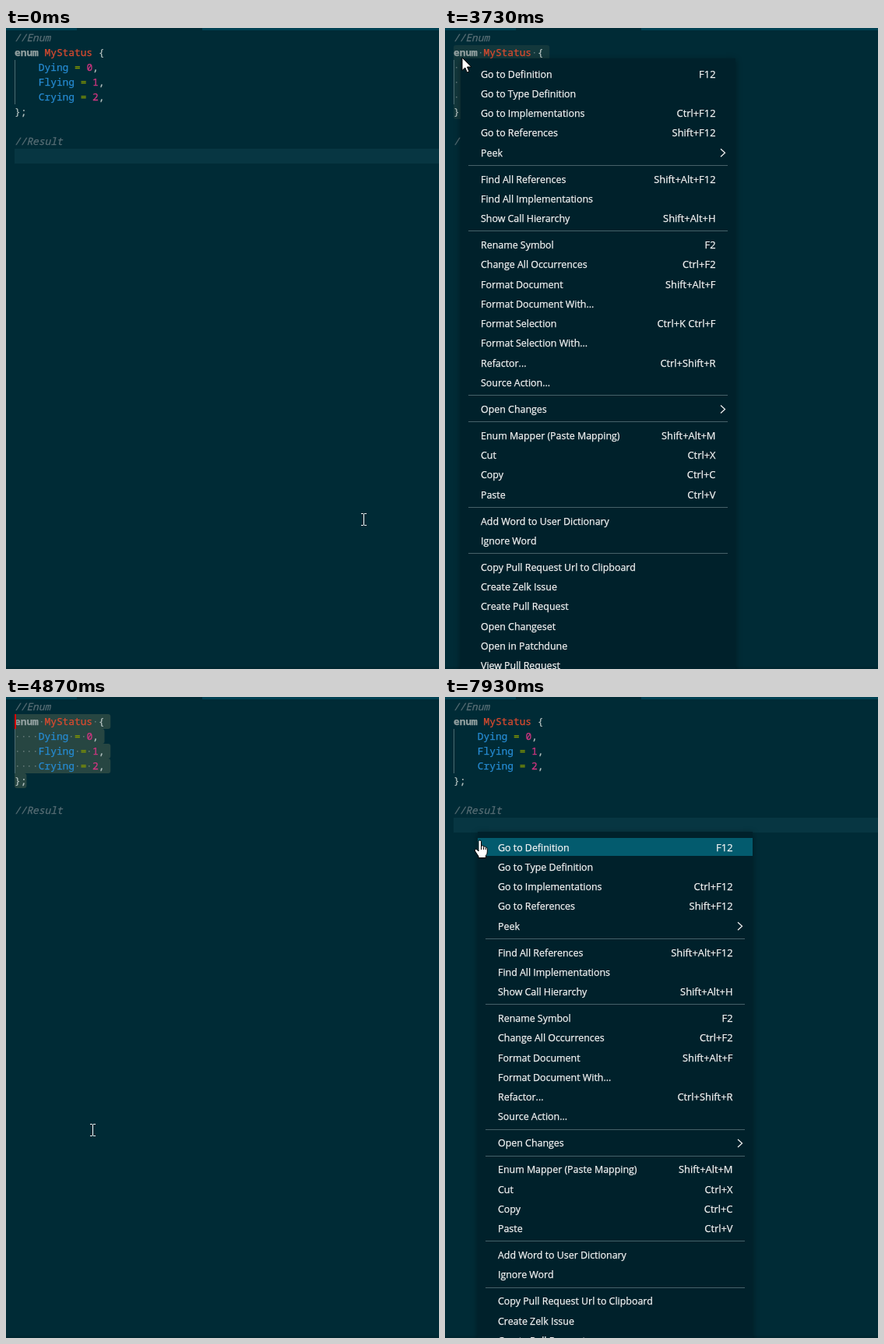
These frames come from a looping animation (556 px wide and 823 px high, 8 s). An HTML page with a canvas:

```html
<!DOCTYPE html>
<html lang="en">
<head>
<meta charset="utf-8">
<title>Enum editor</title>
<style>
html, body { margin: 0; width: 100%; height: 100%; overflow: hidden; background: #002b36; }
canvas { display: block; }
</style>
</head>
<body>
<canvas id="stage" width="556" height="823"></canvas>
<script>
const ctx = document.getElementById('stage').getContext('2d');
const W = 556, H = 823, LOOP = 8000, FPS = 15;
const LEFT = 11, TOP = 3, CHAR = 7.7, LINE = 19;
const MONO = '12.83px "Noto Sans Mono", "DejaVu Sans Mono", monospace';
const UI = '"Open Sans", "Noto Sans", sans-serif';

const STYLE = {
  comment: ['#586e75', 'italic '],
  key: ['#93a1a1', 'bold '],
  type: ['#dc4b2f', ''],
  name: ['#268bd2', ''],
  op: ['#859900', ''],
  num: ['#d33682', ''],
  text: ['#b4c2c0', '']
};

const member = (name, value) =>
  [['text', '    '], ['name', name], ['op', ' = '], ['num', value], ['text', ',']];
const CODE = [
  [['comment', '//Enum']],
  [['key', 'enum'], ['type', ' MyStatus'], ['text', ' {']],
  member('Dying', '0'),
  member('Flying', '1'),
  member('Crying', '2'),
  [['text', '};']],
  [],
  [['comment', '//Result']],
  []
];
const LINES = CODE.map(row => row.map(token => token[1]).join(''));
const ANCHOR = { row: 5, col: 2 };

// "label|shortcut" entries; ">" marks a submenu, "-" a separator
const MENU = `Go to Definition|F12
Go to Type Definition
Go to Implementations|Ctrl+F12
Go to References|Shift+F12
Peek|>
-
Find All References|Shift+Alt+F12
Find All Implementations
Show Call Hierarchy|Shift+Alt+H
-
Rename Symbol|F2
Change All Occurrences|Ctrl+F2
Format Document|Shift+Alt+F
Format Document With...
Format Selection|Ctrl+K Ctrl+F
Format Selection With...
Refactor...|Ctrl+Shift+R
Source Action...
-
Open Changes|>
-
Enum Mapper (Paste Mapping)|Shift+Alt+M
Cut|Ctrl+X
Copy|Ctrl+C
Paste|Ctrl+V
-
Add Word to User Dictionary
Ignore Word
-
Copy Pull Request Url to Clipboard
Create Zelk Issue
Create Pull Request
Open Changeset
Open in Patchdune
View Pull Request`.split('\n');
const MENU_SHORT = MENU.filter(entry => !entry.startsWith('Format Selection'));

const EASE = {
  both: p => p * p * (3 - 2 * p),
  in: p => p * p,
  out: p => p * (2 - p)
};
// time, x, y, easing towards this point
const PATH = [
  [0, 459, 631], [600, 43, 124], [734, 43, 124], [930, 30, 108], [1130, 27, 106],
  [1400, 8, 54], [1600, 1, 30], [2333, 1, 30], [2800, 21, 38], [3667, 21, 38],
  [3733, 22, 38], [4133, 109, 577], [4734, 109, 578], [5000, 118, 490, 'in'],
  [5600, 42, 183, 'out'], [7867, 42, 183], [7933, 45, 184], [LOOP, 45, 184]
];

function pointerAt(t) {
  const i = Math.max(1, PATH.findIndex(k => k[0] >= t));
  const a = PATH[i - 1], b = PATH[i];
  const p = EASE[b[3] || 'both']((t - a[0]) / (b[0] - a[0]));
  return { x: Math.round(a[1] + (b[1] - a[1]) * p), y: Math.round(a[2] + (b[2] - a[2]) * p) };
}

const within = (t, a, b) => t >= a && t < b;
const rowTop = row => TOP + row * LINE;
const colX = col => LEFT + col * CHAR;

function rect(color, x, y, w, h) {
  ctx.fillStyle = color;
  ctx.fillRect(x, y, w, h);
}

// A hairline outline gives the slightly heavier stems of screen-hinted text.
function print(text, x, y, font, color, align = 'left') {
  ctx.font = font;
  ctx.textAlign = align;
  ctx.fillStyle = ctx.strokeStyle = color;
  ctx.lineWidth = .25;
  ctx.fillText(text, x, y);
  ctx.strokeText(text, x, y);
}

function selectionHead(t, pt) {
  if (!within(t, 990, 5720)) return null;
  if (t >= 1660) return { row: 1, col: 0 };
  const row = Math.min(5, Math.max(2, Math.floor((pt.y - TOP) / LINE)));
  const col = Math.round((pt.x - LEFT) / CHAR);
  return { row, col: Math.min(LINES[row].length, Math.max(0, col)) };
}

function caretAt(t, head) {
  if (within(t, 790, 990) || within(t, 5720, 6190)) return { row: 8, col: 0 };
  if (within(t, 990, 2190) || within(t, 4590, 5120)) return head;
  return null;
}

function drawSelection(head, dim) {
  for (let row = head.row; row <= ANCHOR.row; row++) {
    const from = row === head.row ? head.col : 0;
    const to = row === ANCHOR.row ? ANCHOR.col : LINES[row].length + 1;
    if (to <= from) continue;
    ctx.fillStyle = dim ? '#13383c' : '#274642';
    ctx.beginPath();
    ctx.roundRect(colX(from), rowTop(row), (to - from) * CHAR, LINE, [row === head.row ? 3 : 0, 3, 3, row === ANCHOR.row ? 3 : 0]);
    ctx.fill();
    ctx.fillStyle = 'rgba(147,161,161,.6)';
    for (let c = from; c < Math.min(to, LINES[row].length); c++) {
      if (LINES[row][c] === ' ') ctx.fillRect(Math.round(colX(c) + 3), rowTop(row) + 9, 1.5, 1.5);
    }
  }
}

function drawCode() {
  CODE.forEach((tokens, row) => {
    let col = 0;
    for (const [kind, text] of tokens) {
      const [color, face] = STYLE[kind];
      print(text, colX(col), rowTop(row) + 14, face + MONO, color);
      col += text.length;
    }
  });
}

function drawEditor(t, pt) {
  const head = selectionHead(t, pt), caret = caretAt(t, head);
  rect('#002b36', 0, 0, W, H);
  rect('#004052', 0, 0, 91, 3);
  rect('#004052', 252, 0, W - 252, 3);
  rect('#002731', 0, H - 3, W, 3);
  if (head) drawSelection(head, within(t, 2720, 4590));
  else rect('#073642', LEFT, rowTop(8), W - LEFT, LINE);
  rect('#4d6a70', LEFT, rowTop(2), 1, 3 * LINE);
  drawCode();
  if (caret) rect('#d30102', Math.round(colX(caret.col)), rowTop(caret.row), 2, LINE);
}

// Draws the menu and tells whether the pointer is over an entry.
function drawMenu(entries, x, y, pt) {
  const width = 353, ink = '#f4f4f4';
  let mid = y + 20.3, hovering = false;
  ctx.save();
  ctx.shadowColor = 'rgba(0,0,0,.4)';
  ctx.shadowBlur = 8;
  ctx.shadowOffsetY = 2;
  rect('#00212b', x, y, width, H);
  ctx.restore();
  for (const entry of entries) {
    if (entry === '-') {
      rect('#476169', x + 10, Math.round(mid - 9.6), width - 20, 1);
      mid += 8.75;
      continue;
    }
    const [label, hint] = entry.split('|');
    if (pt.x > x + 1 && Math.abs(pt.y - mid) < 12.5) {
      hovering = true;
      rect('#035b6e', x, Math.round(mid - 12), width, 23);
    }
    const base = Math.round(mid + 4.4);
    print(label, x + 26, base, '12.42px ' + UI, ink);
    if (hint === '>') {
      ctx.strokeStyle = ink;
      ctx.lineWidth = 1.2;
      ctx.beginPath();
      ctx.moveTo(x + 334, mid - 5);
      ctx.lineTo(x + 339.5, mid);
      ctx.lineTo(x + 334, mid + 5);
      ctx.stroke();
    } else if (hint) {
      print(hint, x + 327.5, base, '12.9px ' + UI, ink, 'right');
    }
    mid += 25.25;
  }
  return hovering;
}

const ARROW = new Path2D('M0 0V16.5L3.8 13L6.3 19L9 17.8L6.5 12H11.8Z');
const HAND = new Path2D('M-2 1.5Q-2 0 -.3 0Q1.5 0 1.5 1.5V7Q4.5 6.2 4.8 8Q7 7.4 7.4 9Q9.3 8.8 9.3 10.8V15Q9.3 18 7.4 19.5V22.5H-2V20.5L-6.4 14Q-7.3 12 -5.5 11.4Q-4 11 -2 14Z');
const FINGERS = new Path2D('M1.5 7V12M4.6 8.3V12M7.2 9.3V12');

function drawPointer(kind, { x, y }) {
  ctx.save();
  ctx.translate(x, y);
  ctx.fillStyle = '#fff';
  if (kind === 'beam') {
    for (const end of [-8, 7]) {
      ctx.fillRect(-3, end, 3, 1);
      ctx.fillRect(1, end, 3, 1);
    }
    ctx.fillRect(0, -7, 1, 14);
  } else {
    ctx.strokeStyle = '#000';
    ctx.lineWidth = 1;
    ctx.lineJoin = 'round';
    const shape = kind === 'hand' ? HAND : ARROW;
    ctx.fill(shape);
    ctx.stroke(shape);
    if (kind === 'hand') ctx.stroke(FINGERS);
  }
  ctx.restore();
}

function draw(t) {
  const pt = pointerAt(t);
  let kind = pt.x < LEFT || within(t, 2300, 2860) ? 'arrow' : 'beam';
  drawEditor(t, pt);
  if (within(t, 2860, 4590)) kind = drawMenu(MENU, 20, 39, pt) ? 'hand' : 'arrow';
  if (t >= 6530) kind = drawMenu(MENU_SHORT, 42, 173, pt) ? 'hand' : 'arrow';
  drawPointer(kind, pt);
}

const start = performance.now();
function tick() {
  const ms = (performance.now() - start) % LOOP;
  const step = Math.floor((ms + 5) * FPS / 1000) % (LOOP * FPS / 1000);
  draw(step * 1000 / FPS);
  requestAnimationFrame(tick);
}
tick();
</script>
</body>
</html>
```
